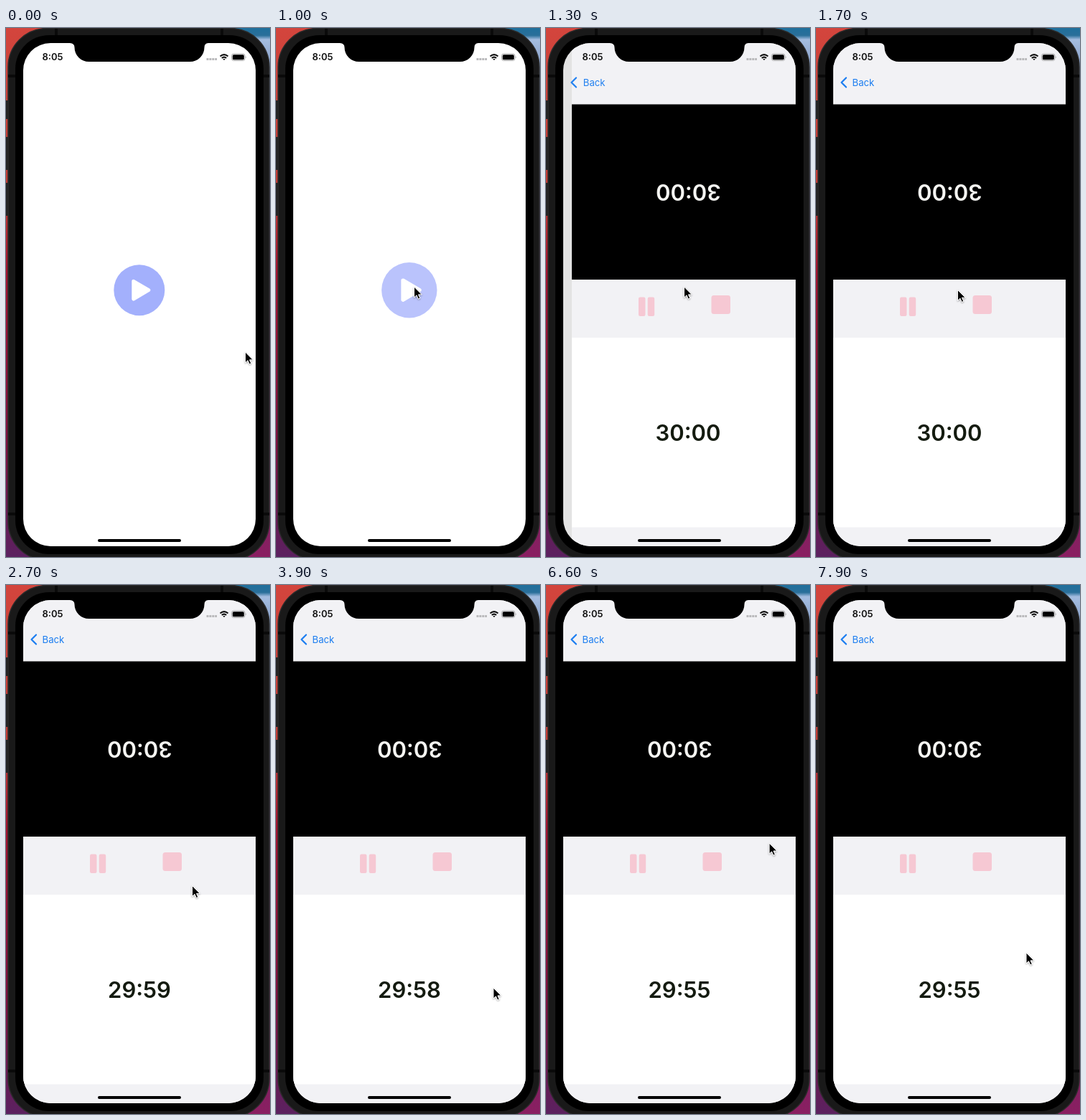
Write an HTML page that moves like this. It is 368 by 738 pixels and loops after 8 s.

```html
<!DOCTYPE html>
<html lang="en">
<head>
<meta charset="utf-8">
<title>Two-player timer</title>
<style>
  html, body { margin: 0; width: 100%; height: 100%; overflow: hidden; background: #000; }
  svg { display: block; width: 368px; height: 738px; }
  text { font-family: Inter, Roboto, sans-serif; }
  .clock { font-size: 31px; font-weight: 600; text-anchor: middle; }
</style>
</head>
<body>
<svg viewBox="0 0 368 738">
  <defs>
    <linearGradient id="leftEdge" x2="0" y2="1">
      <stop offset="0" stop-color="#d3453d"/>
      <stop offset=".32" stop-color="#bd3a32"/>
      <stop offset=".46" stop-color="#a3122f"/>
      <stop offset=".8" stop-color="#7c1040"/>
      <stop offset="1" stop-color="#5b2160"/>
    </linearGradient>
    <linearGradient id="rightEdge" x2="0" y2="1">
      <stop offset="0" stop-color="#1f6f9c"/>
      <stop offset=".014" stop-color="#2a6f9a"/>
      <stop offset=".022" stop-color="#a4bde0"/>
      <stop offset=".12" stop-color="#6f86b4"/>
      <stop offset=".4" stop-color="#3a2a50"/>
      <stop offset="1" stop-color="#8a1f62"/>
    </linearGradient>
    <clipPath id="screen"><rect x="24" y="21" width="324" height="702" rx="38"/></clipPath>
    <filter id="soft" x="-50%" y="-50%" width="200%" height="200%">
      <feDropShadow dx="0" dy="1" stdDeviation="1" flood-opacity=".4"/>
    </filter>
  </defs>

  <!-- Desktop and phone body -->
  <rect width="184" height="738" fill="url(#leftEdge)"/>
  <rect x="184" width="184" height="738" fill="url(#rightEdge)"/>
  <g fill="#222">
    <rect y="101" width="6" height="26"/>
    <rect y="152" width="6" height="46"/>
    <rect y="216" width="6" height="46"/>
  </g>
  <rect x="3" y="0.5" width="364" height="742" rx="54" fill="#191919" stroke="#2b2b2b" stroke-width="1.5"/>
  <g fill="#0a0a0a">
    <rect x="68" y="1" width="4" height="9"/>
    <rect x="299" y="1" width="4" height="9"/>
    <rect x="3" y="65" width="10" height="4"/>
    <rect x="358" y="65" width="9" height="4"/>
    <rect x="3" y="676" width="10" height="4"/>
    <rect x="358" y="676" width="9" height="4"/>
  </g>
  <rect x="13" y="10" width="346" height="724" rx="47"/>

  <g clip-path="url(#screen)">
    <g id="home">
      <rect x="24" y="21" width="424" height="702" fill="#fff"/>
      <g id="play">
        <circle r="35.5" fill="#a3b0fc"/>
        <path d="M-8-12.4 13 0-8 12.4Z" fill="#fff" stroke="#fff" stroke-width="5" stroke-linejoin="round"/>
      </g>
    </g>
    <rect id="dim" x="24" y="21" width="324" height="702" opacity="0"/>

    <g id="game">
      <rect x="24" y="21" width="324" height="702" fill="#f2f2f5"/>
      <rect x="24" y="106.5" width="324" height="244.5"/>
      <rect x="24" y="432" width="324" height="264.5" fill="#fff"/>
      <g fill="#f6c8d3">
        <rect x="117" y="375.5" width="9.5" height="26.5" rx="2.2"/>
        <rect x="129.7" y="375.5" width="9.5" height="26.5" rx="2.2"/>
        <rect x="218.5" y="373" width="26.5" height="26" rx="3.5"/>
      </g>
      <text class="clock" fill="#f5f5f2" transform="translate(186.5 217.5) rotate(180)">30:00</text>
      <text class="clock" id="timer" fill="#141b10" x="186" y="576">30:00</text>
    </g>

    <g id="back" opacity="0">
      <path d="M42 69.5 35.5 76 42 82.5" fill="none" stroke="#1b7df0" stroke-width="2.2" stroke-linecap="round" stroke-linejoin="round"/>
      <text id="backLabel" x="50.5" y="80.7" font-size="13.2" fill="#1b7df0">Back</text>
    </g>

    <!-- Status bar -->
    <text x="50.5" y="45.2" font-size="13" font-weight="600" fill="#111">8:05</text>
    <path d="M279.5 43.5H294" stroke="#b9b9bb" stroke-width="3" stroke-dasharray="3 .9"/>
    <g fill="none" stroke="#111" stroke-width="2">
      <path d="M298.5 39.6Q304 34.6 309.5 39.6M300.8 42Q304 39.2 307.2 42"/>
      <path d="M302.3 43 304 45.2 305.7 43Z" fill="#111" stroke="none"/>
    </g>
    <rect x="314.5" y="36" width="18.5" height="9.5" rx="2.8" fill="none" stroke="#aaa"/>
    <rect x="315.8" y="37.2" width="16" height="7.1" rx="1.6"/>
    <path d="M334.3 39.3q1.5 1.5 0 3Z" fill="#999"/>
    <rect x="128" y="713" width="116" height="4" rx="2"/>
  </g>
  <path d="M89 20H282V21Q276.500 21.500 276.500 27A20 20 0 0 1 256.500 47H115.500A20 20 0 0 1 95.500 27Q95.500 21.500 89 21Z"/>

  <g id="cursor" filter="url(#soft)">
    <path d="M0 0V15L3.5 11.8 5.8 17 8.3 16 6 10.9H10.8Z" stroke="#fff" stroke-width="1" stroke-linejoin="round"/>
  </g>
</svg>
<script>
  const LOOP = 8000, STEP = 100;
  const el = id => document.getElementById(id);
  const move = (id, x, y = 0, scale = 1) =>
    el(id).setAttribute('transform', `translate(${x} ${y}) scale(${scale})`);
  const smooth = p => p * p * (3 - 2 * p);
  const linear = p => p;

  // Each row is a time followed by its values.
  const pointer = [
    [200, 333.5, 452], [900, 192.5, 361], [1500, 192.5, 361], [2700, 259.5, 419.5],
    [3900, 303, 562], [4200, 303, 562], [5500, 326, 235], [5900, 326, 235], [7400, 293, 513]
  ];
  const press = [[800, 1, 1], [1000, 1.09, .75], [1200, 1.09, .75], [1400, 1, 1]];
  const push = [[1100, 1], [1200, .3], [1300, .037], [1400, .004], [1500, 0]];

  function sample(rows, t, ease) {
    const next = rows.findIndex(row => row[0] > t);
    if (next === 0) return rows[0].slice(1);
    if (next < 0) return rows.at(-1).slice(1);
    const a = rows[next - 1], b = rows[next];
    const p = ease((t - a[0]) / (b[0] - a[0]));
    return a.slice(1).map((v, i) => v + (b[i + 1] - v) * p);
  }

  function draw(t) {
    const [x, y] = sample(pointer, t, smooth);
    const [scale, alpha] = sample(press, t, linear);
    const [rest] = sample(push, t, linear);
    const shown = 1 - rest;

    move('cursor', x, y);
    move('play', 185.8, 365.7, scale);
    el('play').setAttribute('opacity', alpha);
    move('home', -97 * shown);
    move('game', 324 * rest);
    el('dim').setAttribute('opacity', .115 * shown);
    el('back').setAttribute('opacity', shown);
    move('backLabel', 35 * rest);

    const ticks = Math.min(5, Math.max(0, Math.floor((t - 1200) / 1000)));
    el('timer').textContent = ticks ? `29:${60 - ticks}` : '30:00';
  }

  const start = performance.now();
  function frame() {
    const t = (performance.now() - start) % LOOP;
    draw(Math.floor(t / STEP) * STEP);
    requestAnimationFrame(frame);
  }
  frame();
</script>
</body>
</html>
```
